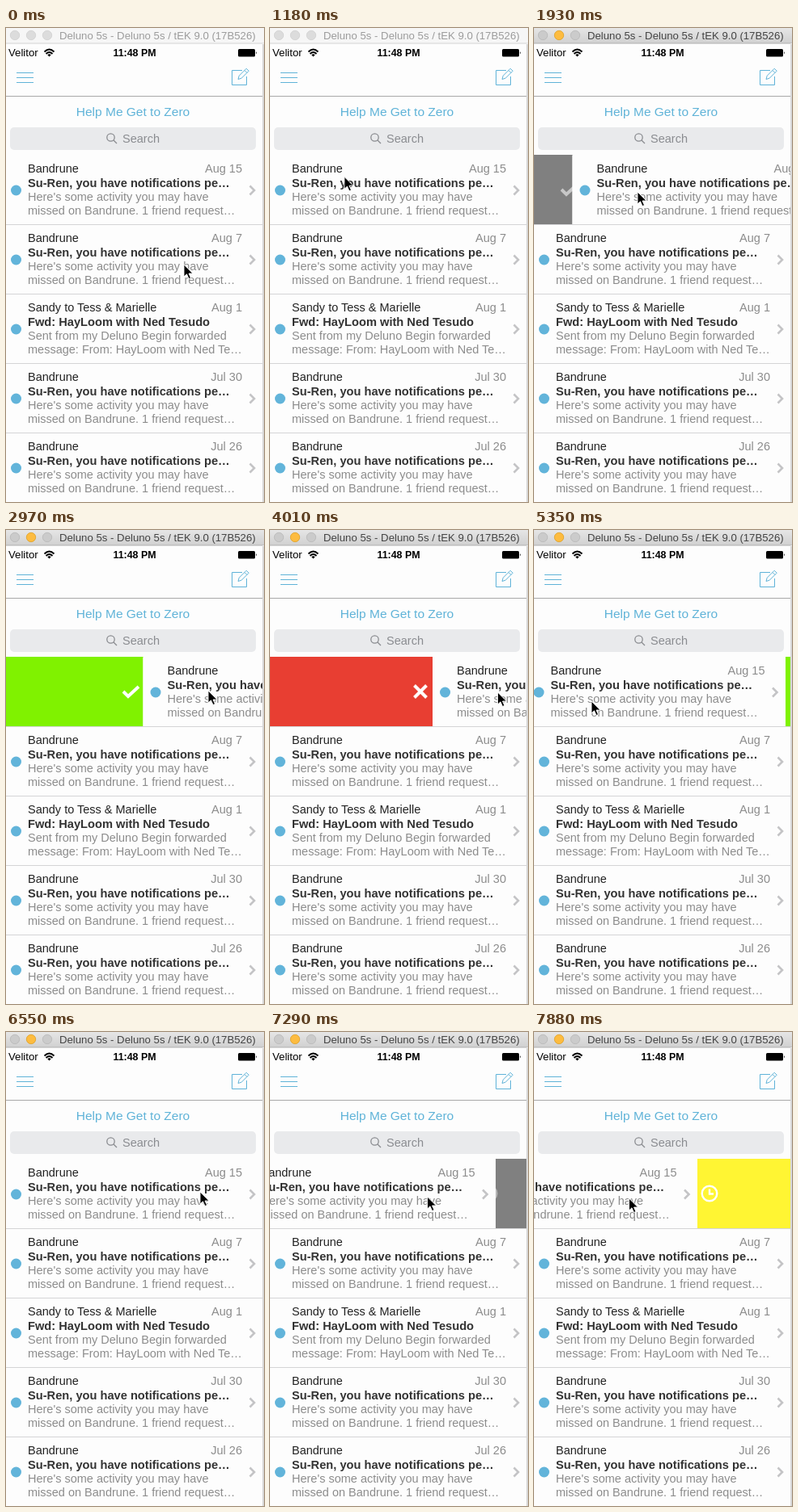
Write an HTML page that moves like this. It is 319 by 587 pixels and loops after 8000 ms.

```html
<!DOCTYPE html>
<html lang="en">
<head>
<meta charset="utf-8">
<title>Inbox swipe</title>
<style>
html, body { margin: 0; height: 100%; overflow: hidden; background: #fdfdfd; }
svg { display: block; font: 14.5px "Liberation Sans", Arial, sans-serif; }
.line { fill: none; stroke: #5fb3d8; }
.bold { font-size: 14.65px; font-weight: bold; fill: #333; }
.grey { fill: #8c8c8c; }
.end { text-anchor: end; }
.mid { text-anchor: middle; }
.icon { fill: none; stroke: #fff; stroke-width: 4; }
</style>
</head>
<body>
<svg width="319" height="587">
  <defs>
    <linearGradient id="bar" x2="0" y2="1">
      <stop stop-color="#e6e6e6"/><stop offset="1" stop-color="#d0d0d0"/>
    </linearGradient>
  </defs>
  <rect width="319" height="587" fill="#fdfdfd"/>

  <rect id="titleBar" width="319" height="19"/>
  <path id="titleLine" d="M0 19H319"/>
  <g id="lights" stroke-width=".8"></g>
  <text id="title" x="66" y="14" font-size="13.2">Deluno 5s - Deluno 5s / tEK 9.0 (17B526)</text>

  <text x="3" y="35" font-size="13.2">Velitor</text>
  <g fill="none" stroke="#000" stroke-width="1.8">
    <path d="M47.5 29.5q6 -6 12 0M49.5 32q4 -4 8 0"/>
    <path d="M51.3 33.3q2.2 -2 4.4 0l-2.2 2.3z" fill="#000" stroke="none"/>
  </g>
  <text class="mid" x="159" y="35" font-size="12.4" font-weight="bold">11:48 PM</text>
  <rect x="287" y="26" width="21" height="9.5" rx="1.5"/>
  <path d="M309 29q1.8 1.8 0 3.6z"/>

  <path class="line" d="M13 55.5h21m-21 6h21m-21 6h21"/>
  <path class="line" d="M292 52.5h-12.5v18h18V60M287 63.500l1.200 -4.300 9 -9 3 3 -9 9zM295 52.500l3 3"/>
  <path d="M0 84.5H317" stroke="#a8a8a8"/>
  <text class="mid" x="157" y="109" font-size="15.5" fill="#5fb3d8">Help Me Get to Zero</text>
  <rect x="5" y="123" width="304" height="28" rx="5" fill="#e9eaec"/>
  <g fill="none" stroke="#8a8c90" stroke-width="1.3">
    <circle cx="129.500" cy="135.500" r="4.700"/><path d="M133 139l4 4"/>
  </g>
  <text x="144" y="142" fill="#8a8c90">Search</text>

  <rect id="strip" y="157" height="86"/>
  <g id="icons" class="icon">
    <path id="check" d="M-9.5 0l6 6 13 -12"/>
    <path id="cross" d="M-7.5 -7.5l15 15m0 -15l-15 15"/>
    <g id="clock" stroke-width="2.4"><circle r="9.3"/><path d="M0 -5.5v6h5"/></g>
  </g>
  <g id="rows"></g>

  <rect x="317" width="2" y="19.5" height="568" fill="#fdfdfd"/>
  <path d="M318 20V587" stroke="#b4b4b4"/>
  <path id="cursor" d="M0 0V15l3.5 -3.2 2.5 5.7 2.5 -1 -2.5 -5.500h5z" stroke="#fff" stroke-width=".9"/>
</svg>
<script>
const LOOP = 8000, STEP = 148.7;
const LEFT = -3, RIGHT = 317.5, TOP = 157, ROW = 86;
const $ = id => document.getElementById(id);
const show = (id, on) => $(id).setAttribute('display', on ? 'inline' : 'none');
const set = (id, attrs) => {
  for (const k in attrs) $(id).setAttribute(k, attrs[k]);
};

const notice = date => [date, 'Bandrune', 'Su-Ren, you have notifications pe…',
  "Here's some activity you may have", 'missed on Bandrune. 1 friend request…'];
const mails = [
  notice('Aug 15'),
  notice('Aug 7'),
  ['Aug 1', 'Sandy to Tess &amp; Marielle', 'Fwd: HayLoom with Ned Tesudo',
    'Sent from my Deluno Begin forwarded', 'message: From: HayLoom with Ned Te…'],
  notice('Jul 30'),
  notice('Jul 26')
];
$('rows').innerHTML = mails.map(([date, from, subject, a, b], i) => `
  <g transform="translate(0 ${TOP + ROW * i})">
    <g id="row${i}">
      <rect x="${LEFT}" y="1" width="${RIGHT - LEFT}" height="${ROW - 1}" fill="#fdfdfd"/>
      <circle cx="12.5" cy="44" r="6.5" fill="#62b4da"/>
      <text x="27" y="22" fill="#222">${from}</text>
      <text class="grey end" x="292" y="22">${date}</text>
      <text class="bold" x="27" y="39.5">${subject}</text>
      <text class="grey" x="27" y="57">${a}</text>
      <text class="grey" x="27" y="73.5">${b}</text>
      <path d="M301.5 38.5l5.5 5.5 -5.5 5.5" fill="none" stroke="#c4c4c6" stroke-width="2.6"/>
    </g>
    <path d="M0 ${ROW + .5}H317" stroke="#d4d4d6"/>
  </g>`).join('');
$('lights').innerHTML = [11, 31, 51].map(x => `<circle cx="${x}" cy="9" r="5.7"/>`).join('');

// Pointer moves: first step, last step, end point, ease-out power
const moves = [
  [2, 6, 110, 161, 1],
  [6, 9, 77.5, 203, 2],
  [10, 13, 128, 203, 1],
  [13, 20, 250, 199, 1],
  [20, 27, 281.5, 201, 2],
  [29, 36, 71, 212, 2],
  [37, 39, 74.5, 212, 1],
  [40, 44, 240, 198, 1],
  [44, 47, 233, 203, 1],
  [47, 53, 117.5, 206, 1]
];
// While pressed, the top row follows the pointer
const drags = [
  { from: 10, to: 40, x: 77.5 },
  { from: 47, to: 54, x: 233 }
];

function pointer(n) {
  let x = 220, y = 293;
  for (const [from, to, toX, toY, power] of moves) {
    const t = Math.min(1, Math.max(0, (n - from) / (to - from)));
    const p = 1 - (1 - t) ** power;
    x += (toX - x) * p;
    y += (toY - y) * p;
  }
  return [x, y];
}

// Colours change at the thresholds; green stays on the way back
function stripColor(dx, returning) {
  if (dx >= 190) return '#e83e32';
  if (dx > 60 || returning) return '#80f200';
  return dx < -60 ? '#fff533' : '#808080';
}

function drawTitle(active) {
  set('titleBar', { fill: active ? 'url(#bar)' : '#f6f6f6' });
  set('titleLine', { stroke: active ? '#b0b0b0' : '#d2d2d2' });
  set('title', { fill: active ? '#444' : '#9c9c9c' });
  set('lights', active ? { fill: '#cbcbcb', stroke: '#b8b8b8' } : { fill: '#dcdcdc', stroke: '#d0d0d0' });
  $('lights').children[1].style.cssText = active ? 'fill: #fdbc40; stroke: #dfa023' : '';
}

function draw(now) {
  const n = Math.floor((now % LOOP + 5) / STEP);
  const [x, y] = pointer(n);
  const drag = drags.find(d => n >= d.from && n <= d.to);
  const dx = drag ? x - drag.x : 0;
  const edge = (dx < 0 ? RIGHT : LEFT) + dx;
  const iconX = dx < 0 ? Math.min(271, edge + 15) : Math.max(43.5, edge - 15);
  drawTitle(n > drags[0].from);
  set('strip', {
    x: dx < 0 ? edge : LEFT,
    width: Math.abs(dx),
    fill: stripColor(dx, drag === drags[0] && n > 29)
  });
  set('icons', {
    transform: `translate(${iconX} 200)`,
    opacity: Math.abs(dx) > 60 ? 1 : Math.abs(dx) / 90
  });
  show('check', dx >= 0 && dx < 190);
  show('cross', dx >= 190);
  show('clock', dx < 0);
  set('row0', { transform: `translate(${dx} 0)` });
  set('cursor', { transform: `translate(${x} ${y})` });
  requestAnimationFrame(draw);
}
draw(performance.now());
</script>
</body>
</html>
```
